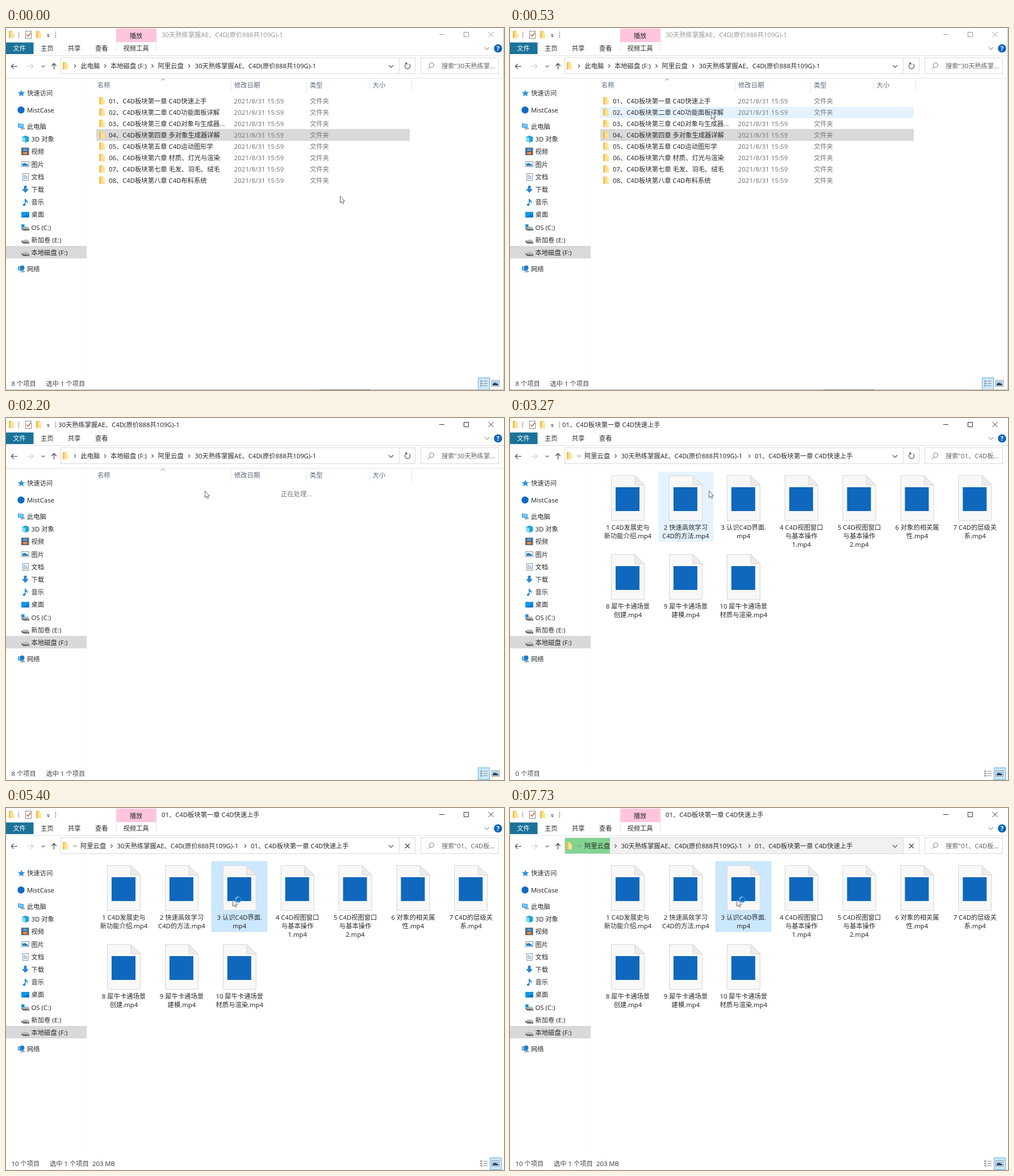
An HTML page that plays this animation: 877 by 638 pixels, repeating every 8 s.

```html
<!DOCTYPE html>
<html lang="zh-CN">
<head>
<meta charset="utf-8">
<title>文件夹窗口</title>
<style>
html, body { margin: 0; width: 877px; height: 638px; overflow: hidden; background: #fff; }
svg { display: block; }
text { font: 11.3px "Noto Sans", "Noto Sans CJK SC", sans-serif; white-space: pre; }
.date { letter-spacing: .17px; }
.mid { text-anchor: middle; }
</style>
</head>
<body>
<svg id="stage" width="877" height="638" viewBox="0 0 877 638"></svg>
<script>
const LOOP = 8000, STEP = 200 / 3;
const INK = '#2b2b2b', GREY = '#777', RULE = '#e3e3e3';

// drawing helpers: each returns SVG markup
const text = (x, y, s, fill = INK, cls = '') =>
  `<text x="${x}" y="${y + 4.2}" fill="${fill}" class="${cls}">${s}</text>`;
const mid = (x, y, s, fill) => text(x, y, s, fill, 'mid');
const box = (x, y, w, h, fill, more = '') =>
  `<rect x="${x}" y="${y}" width="${w}" height="${h}" fill="${fill}" ${more}/>`;
const frame = (x, y, w, h, stroke, fill = 'none') =>
  box(x + .5, y + .5, w - 1, h - 1, fill, `stroke="${stroke}"`);
const line = (d, stroke = '#555', w = 1, fill = 'none') =>
  `<path d="${d}" fill="${fill}" stroke="${stroke}" stroke-width="${w}"/>`;
const shape = (d, fill) => `<path d="${d}" fill="${fill}"/>`;
const disc = (x, y, r, fill) => `<circle cx="${x}" cy="${y}" r="${r}" fill="${fill}"/>`;
const at = (x, y, s) => `<g transform="translate(${x} ${y})">${s}</g>`;
const during = (from, to, s) => `<g data-from="${from}" data-to="${to}">${s}</g>`;
const since = (from, s) => during(from, LOOP + 9, s);
const right = (x, y) => line(`M${x - 1.5} ${y - 3}l3 3l-3 3`, '#555', 1.1);
const down = (x, y, c = '#555', r = 4) => line(`M${x - r} ${y - r / 2}l${r} ${r}l${r} ${-r}`, c, 1.2);
const folder = (x, y) => at(x, y,
  shape('M0 0H5.5L7 1.5V4H9V13H0Z', '#f4cb62') + shape('M2.5 1.5H7V4H9V13H2.5Z', '#ffe294') +
  shape('M0 0L2.5 1.5V13L0 12Z', '#efbd4a'));

const COURSE = '30天熟练掌握AE、C4D(原价888共109G)-1';
const CHAPTERS = ['一章 C4D快速上手', '二章 C4D功能面板详解', '三章 C4D对象与生成器...', '四章 多对象生成器详解',
  '五章 C4D运动图形学', '六章 材质、灯光与渲染', '七章 毛发、羽毛、绒毛', '八章 C4D布料系统']
  .map((s, i) => `0${i + 1}、C4D板块第${s}`);
const VIDEOS = ['1 C4D发展史与|新功能介绍.mp4', '2 快速高效学习|C4D的方法.mp4', '3 认识C4D界面.|mp4',
  '4 C4D视图窗口|与基本操作|1.mp4', '5 C4D视图窗口|与基本操作|2.mp4', '6 对象的相关属|性.mp4',
  '7 C4D的层级关|系.mp4', '8 犀牛卡通场景|创建.mp4', '9 犀牛卡通场景|建模.mp4', '10 犀牛卡通场景|材质与渲染.mp4'];

const titleBar = () => {
  const buttons = c => line('M763 11.5h9M806.5 7.5h8v8h-8zM849.5 7l9 9M858.5 7l-9 9', c);
  const tools = box(194, 1, 71, 24, '#ffc5de') + mid(229, 14, '播放') + mid(229, 36, '视频工具') +
    line('M194.5 25v17M264.5 25v17', '#e8e8e8');
  return folder(5, 5) + line('M22.5 6v12M87.5 6v12', '#999') +
    frame(34, 5, 11, 14, '#8a8a8a', '#fff') + line('M36.5 11.5l2.5 3l4.5 -6', '#d0643c', 1.6) +
    folder(53, 5) + line('M72 11.5h4.5', '#444') + shape('M72 13.5h5l-2.5 2.5z', '#444') +
    during(0, 1600, tools) + since(4270, tools) +
    during(0, 1330, text(274, 12, COURSE, '#999') + buttons('#999')) +
    since(1330, buttons('#333')) +
    during(1330, 1600, text(274, 12, COURSE)) +
    during(1600, 2270, text(92, 12, COURSE)) +
    during(2270, 4270, text(92, 12, CHAPTERS[0])) +
    since(4270, text(274, 12, CHAPTERS[0]));
};

const ribbon = () => box(0, 25.5, 48.5, 20.5, '#1b739a') + mid(23.5, 36, '文件', '#fff') +
  text(61, 36, '主页') + text(109, 36, '共享') + text(157, 36, '查看') +
  line('M0 48.5H877', RULE) + down(847, 36, '#999') +
  disc(866.5, 36, 7.3, '#0f67b9') +
  '<text x="866.5" y="40.3" class="mid" fill="#fff" style="font-weight:700">?</text>';

const addressBar = () => {
  const here = folder(100, 60) + right(121.5, 67) + text(131.5, 67, '此电脑') + right(174.5, 67) +
    text(184, 67, '本地磁盘 (F:)') + right(258, 67) + text(267.5, 67, '阿里云盘') +
    right(322.5, 67) + text(332.5, 67, COURSE);
  const inside = folder(100, 60) + line('M121 65l-2 2l2 2M124.5 65l-2 2l2 2', '#777') +
    text(131, 67, '阿里云盘') + right(186, 67) + text(195.5, 67, COURSE) +
    right(421.5, 67) + text(431, 67, CHAPTERS[0]);
  const reload = line('M703.8 64a4.6 4.6 0 1 0 5.8 -0.8', '#555', 1.2) + shape('M702 61h4.5v4.5z', '#555');
  return line('M20 67.5H9.5M13.5 63.2L9.3 67.5L13.5 71.8', '#444', 1.2) +
    line('M37 67.5H47.5M43.5 63.2L47.7 67.5L43.5 71.8', '#ccc', 1.2) + down(65.5, 67.5, '#666', 2.8) +
    line('M84.5 73V62.5M80.3 67L84.5 62.5L88.7 67', '#444', 1.2) +
    since(5470, box(97, 53, 595, 28, '#f1f1f1')) +
    box(97, 53, 0, 28, '#82d590', 'id="progress"') +
    frame(96, 52, 625, 29, '#d9d9d9') + line('M692.5 53v28', '#d9d9d9') + down(678, 67.5) +
    during(0, 2270, here) + since(2270, inside) +
    during(0, 5400, reload) + since(5400, line('M703 63l8 8M711 63l-8 8', '#444', 1.3)) +
    frame(730, 52, 138, 29, '#d9d9d9') +
    line('M746.8 68.4L743 72M746.8 68.4a4 4 0 1 1 5.4 0a4 4 0 0 1 -5.4 0', '#777') +
    during(0, 3070, text(767, 67, '搜索"30天熟练掌...', '#666')) +
    since(3070, text(767, 67, '搜索"01、C4D板...', '#666'));
};

const drive = (x, y) => at(x, y, shape('M0 2L4 0H12L14 4V6H4L0 4Z', '#b9b9b9') +
  shape('M4 4H14V7H4L0 4.5V2.5Z', '#6b6b6b') + box(10, 5, 2, 1, '#8fd98f'));
const monitor = (x, y) => at(x, y, shape('M0 0L10 1.5V9L0 7Z', '#2d9ae0') +
  shape('M1 1.2L9 2.5V7L1 5.6Z', '#7bcdf7') + shape('M4 9L12 8L13 10L6 11Z', '#9aa8b3'));

const navIcons = () =>
  shape('M27 109l1.9 4l4.4 .4l-3.3 2.9l1 4.3l-4 -2.3l-3.9 2.3l1 -4.3l-3.2 -2.9l4.3 -.4z', '#2f93dd') +
  disc(26.5, 144.5, 6.2, '#0f6cc4') + monitor(21, 168) +
  shape('M28 192l6.5 -2.5l6 2.5v7.5l-6 2.5l-6.5 -2.5z', '#23a6d6') + shape('M28 192l6 2v8l-6 -2.5z', '#8edcf2') +
  box(27, 211, 13.5, 13, '#3b4450') + box(30, 212, 7.5, 5, '#4aa0e6') + box(30, 218, 7.5, 5, '#dc8a4c') +
  `<g stroke-dasharray="1.5 1.5">${line('M28.5 212v11M39 212v11', '#cfd3d8', 1.2)}</g>` +
  frame(27, 235, 14, 10, '#8d9aa5', '#eaf5fd') + shape('M29 243v-4l4 -1l6 3v2z', '#277fb9') +
  frame(29, 256, 11, 13, '#8c969e', '#fff') + line('M31 259.5h4M31 261.5h7M31 263.5h7M31 265.5h7', '#7ba4c2') +
  shape('M31.5 278h5v6h3.7l-6.2 6.5l-6.2 -6.5h3.7z', '#2b87d8') +
  shape('M33 301h1.5q.5 2.5 3.5 4v4q-1 -3 -3.5 -3.5v5.5q-.5 2.5 -3 2.5q-2.5 -.5 -1.5 -3q1 -1.5 3 -1z', '#1a86d9') +
  box(27, 324, 14, 10, '#1497e8') + shape('M27 334l14 -7v7z', '#0b79cf') +
  drive(27, 350) + box(27, 346, 5.5, 5.5, '#1597dd') + drive(27, 373) + drive(27, 395) +
  monitor(21, 420) + disc(28.5, 422.5, 4, '#2876bd');

const navPane = () => {
  const top = [['快速访问', 115], ['MistCase', 144.5], ['此电脑', 174], ['网络', 425]];
  const sub = ['3D 对象', '视频', '图片', '文档', '下载', '音乐', '桌面', 'OS (C:)', '新加卷 (E:)', '本地磁盘 (F:)'];
  return line('M142.5 89V612', '#fafafa') + box(0, 384, 142, 22, '#d9d9d9') + navIcons() +
    top.map(([s, y]) => text(37, y, s)).join('') +
    sub.map((s, i) => text(44.5, 196 + i * 22.2, s)).join('');
};

const listView = () => {
  const row = (name, i) => {
    const y = 128.7 + i * 20;
    return folder(164.5, y - 7) + text(181, y, name) +
      text(401.5, y, '2021/8/31 15:59', GREY, 'date') + text(535, y, '文件夹', GREY);
  };
  const head = [[161, '名称'], [402, '修改日期'], [535, '类型'], [645.5, '大小']];
  return during(0, 2800, line('M0 88.5H877', RULE) +
      line('M397 89v24M529.5 89v24M640.5 89v24M714.5 89v24', '#e8e8e8') +
      line('M273 92.5l3.5 -3l3.5 3', '#777') +
      head.map(([x, s]) => text(x, 100.5, s, '#56647a')).join('')) +
    during(0, 1130, box(159, 0, 552, 20, '#e5f3ff', 'id="rowHover"') + box(159, 178, 552, 21, '#d9d9d9')) +
    during(1130, 2200, box(159, 119, 552, 20, '#cce8ff')) +
    during(0, 2200, CHAPTERS.map(row).join('')) +
    during(2200, 2400, text(484, 134, '正在处理...', GREY));
};

const iconView = () => {
  const page = line('M.5 .5H42L58.5 17V79.5H.5Z', '#d6d6d6', 1, '#f8f8f8') +
    line('M42 .5V17H58.5Z', '#d6d6d6', 1, '#ececec') + box(8, 21, 42, 42, '#0f68bd');
  const item = (name, i) => {
    const x = 207.5 + i % 7 * 101.9, y = 101 + Math.floor(i / 7) * 139;
    return at(x - 29.5, y, page) + name.split('|').map((s, k) => mid(x, y + 92 + k * 15, s)).join('');
  };
  return during(3200, 4000, box(261, 95, 97, 123, '#e5f3ff', 'id="itemHover"')) +
    since(4000, frame(362, 94, 98, 124, '#b8dcf7', '#cce8ff')) +
    since(3200, VIDEOS.map(item).join(''));
};

const statusBar = () => {
  const chosen = x => frame(x, 616, 21, 22, '#5fb4e5', '#cce8ff');
  const glyphs = line('M835 622.5h4M835 626.5h4M835 630.5h4', '#8a8a8a', 2) +
    line('M841 622.5h7M841 626.5h7M841 630.5h7', '#8a8a8a') +
    frame(855, 621, 14, 11, '#8a8a8a', '#fff') + box(857, 623, 10, 7, '#9cc9ea') +
    shape('M857 630v-3l4 -2l6 3v2z', '#27486b');
  const note = (x, s) => text(x, 627, s, '#444');
  return during(0, 3070, note(9.5, '8 个项目') + note(70.5, '选中 1 个项目') + chosen(831)) +
    during(3070, 3330, note(9.5, '0 个项目')) +
    since(3330, note(9.5, '10 个项目')) +
    since(4000, note(77, '选中 1 个项目') + note(152, '203 MB')) +
    since(3070, chosen(852)) + glyphs;
};

const pointer = () => {
  const ring = (x, y, r, w) => `<circle cx="${x}" cy="${y}" r="${r}" fill="none" stroke="#1f86d6" stroke-width="${w}"/>` +
    line(`M${x - r} ${y}A${r} ${r} 0 0 1 ${x} ${y - r}`, '#7cc4f5', w);
  const arrow = line('M.5 .5V12.3L3.2 9.8L5 13.8L6.8 13L5.1 9.2H8.6Z', '#555', .9, '#fff');
  return during(1330, 1870, ring(350.7, 128.5, 6.5, 3)) +
    `<g id="cursor">${during(0, 1330, arrow) + since(1870, arrow)}` +
    since(4530, ring(10, .3, 4.4, 2.2)) + '</g>';
};

const edges = () => during(0, 1330, line('M876.5 0V638M0 637.5H877', '#bdbdbd') + line('M552 637.5h90', '#777'));

const $ = id => document.getElementById(id);
$('stage').innerHTML = [titleBar, ribbon, addressBar, navPane, listView, iconView, statusBar, edges, pointer]
  .map(draw => draw()).join('');

// [time, x, y] and [time, x]
const PATH = [[0, 588, 296], [67, 576, 288], [200, 505, 242], [333, 424, 192], [467, 364, 156],
  [533, 354, 148], [667, 351, 136], [800, 350, 128], [3467, 350, 128], [3600, 357, 132],
  [3800, 387, 152], [3933, 399, 161]];
const FILL = [[5400, 97], [5600, 115], [5800, 128], [6000, 139], [6200, 147], [6800, 160],
  [7067, 165], [7333, 170], [7733, 176]];

function track(keys, t) {
  const k = keys.findIndex(key => key[0] > t);
  if (k < 0) return keys[keys.length - 1].slice(1);
  if (k === 0) return keys[0].slice(1);
  const a = keys[k - 1], b = keys[k], p = (t - a[0]) / (b[0] - a[0]);
  return a.slice(1).map((v, i) => v + (b[i + 1] - v) * p);
}

const timed = [...document.querySelectorAll('[data-from]')]
  .map(el => ({ el, from: +el.dataset.from, to: +el.dataset.to }));
const show = (el, on) => { el.style.display = on ? '' : 'none'; };

function render(ms) {
  const t = Math.floor((ms % LOOP + 4) / STEP) * STEP;
  for (const { el, from, to } of timed) show(el, t + 5 >= from && t + 5 < to);
  const [x, y] = track(PATH, t);
  $('cursor').setAttribute('transform', `translate(${x} ${y})`);
  const row = Math.floor((y - 119 + .5) / 20);
  show($('rowHover'), row >= 0 && row < 8);
  $('rowHover').setAttribute('y', 119 + row * 20);
  $('itemHover').setAttribute('x', x < 360 ? 261 : 363);
  $('progress').setAttribute('width', Math.round(track(FILL, t)[0] - 97));
}

const start = performance.now();
function tick() {
  render(performance.now() - start);
  requestAnimationFrame(tick);
}
tick();
</script>
</body>
</html>
```
